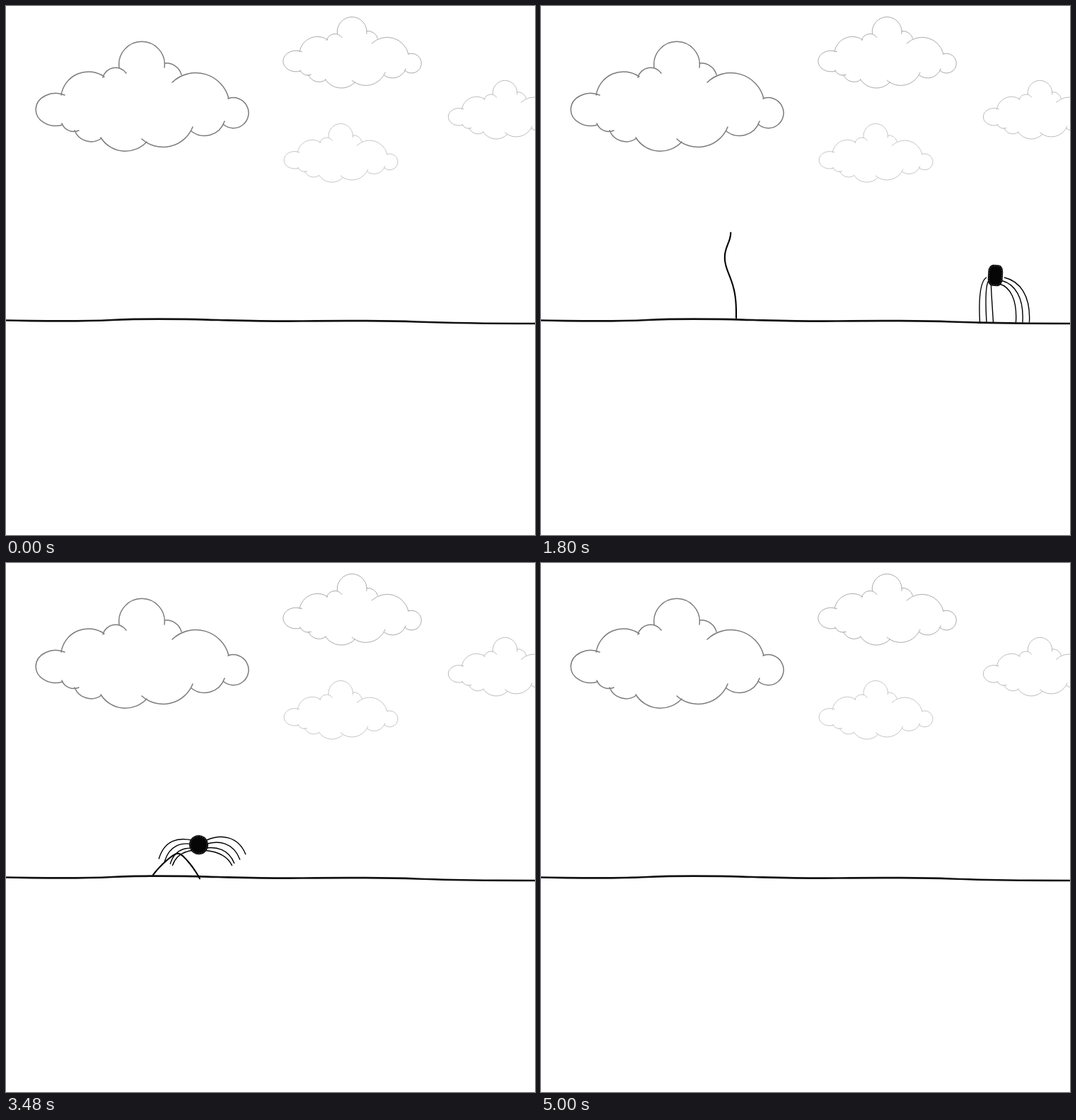
Recreate the animation shown at these times as an HTML page. Size 748 px wide and 748 px high, loop 5.57 s.

```html
<!DOCTYPE html>
<html lang="en">
<head>
<meta charset="utf-8">
<title>Spider and worm</title>
<style>
  html, body { margin: 0; width: 100%; height: 100%; overflow: hidden; background: #fff; }
  svg { display: block; width: 100%; height: 100%; }
  path { fill: none; stroke-linecap: round; stroke-linejoin: round; }
  .cloud { vector-effect: non-scaling-stroke; }
</style>
</head>
<body>
<svg viewBox="0 0 748 748">
  <defs>
    <path id="cloud" class="cloud" d="M160 87A32.3 32.3 0 1 1 224 87
      M137 101A18.5 18.5 0 0 1 170 95 M224 81A22 22 0 0 1 248 97
      M78 126A39 39 0 0 1 139 100 M83 126A28 23 0 1 0 80 168
      M79 166A18 18 0 0 0 103 176 M97 176A25 25 0 0 0 135 187
      M134 186A41 41 0 0 0 199 192 M192 188A45 45 0 0 0 264 171
      M262 177A30 30 0 0 0 309 163 M314 131A21.5 21.5 0 1 1 307 167
      M235 108A48 48 0 0 1 315 131"/>
  </defs>
  <use href="#cloud" stroke="#7c7c7c" stroke-width="1.5"/>
  <use href="#cloud" stroke="#aaa" transform="translate(364.4 -17.2) scale(.65)"/>
  <use href="#cloud" stroke="#c6c6c6" transform="translate(370.5 139.5) scale(.535)"/>
  <use href="#cloud" stroke="#bcbcbc" transform="translate(602.8 78.4) scale(.535)"/>
  <path stroke="#111" stroke-width="2.7" d="M-2 444.5C50 445 90 447 150 444S260 443 300 444S370 446 420 445.5S530 444.6 580 446.5S660 449 750 449"/>
  <path id="worm" stroke="#000" stroke-width="2.1"/>
  <g id="spider">
    <path id="legs" stroke="#000"/>
    <g id="body">
      <rect id="shell" fill="#060606"/>
      <rect id="rim" fill="none" stroke="#888" stroke-width=".5" stroke-dasharray="2 1.5"/>
    </g>
  </g>
</svg>
<script>
const LOOP = 5570, STEP = 80, FIRST = 40;
const ENTER = 600, POUNCE = 3320, LAND = 3640, LIFT = 3880, LEAVE = 5000;
const el = id => document.getElementById(id);
const set = (node, attrs) => { for (const k in attrs) node.setAttribute(k, attrs[k]); };
const mix = (a, b, k) => a.map((v, i) => v + (b[i] - v) * k);
const ramp = (t, from, to) => Math.min(1, Math.max(0, (t - from) / (to - from)));

// Linear interpolation over rows of [time, ...values]
function track(keys, t) {
  let i = 0;
  while (i < keys.length - 2 && t >= keys[i + 1][0]) i++;
  const [a, b] = [keys[i], keys[i + 1]];
  return mix(a, b, ramp(t, a[0], b[0])).slice(1);
}

function show(id, visible) {
  el(id).style.display = visible ? '' : 'none';
  return visible;
}

// time, base x, length, wave, bend, tilt, kink
const wormKeys = [
  [520, 304, 105, 0, 0, 0, 0],
  [1240, 277, 104, 0, 0, .03, 0],
  [1800, 276, 124, .37, 0, 0, 0],
  [2200, 208, 120, 0, .9, 0, 0],
  [2520, 203, 112, 0, 1.85, 0, 0],
  [3080, 208, 95, 0, 2, .65, .65]
];

// The worm is a chain whose heading changes along its length
function drawWorm(t) {
  if (!show('worm', t >= FIRST && t < LAND)) return;
  const [base, length, wave, bend, tilt, kink] = track(wormKeys, t);
  const parts = 40, link = length / parts * ramp(t, FIRST - STEP, 520);
  let x = base, y = 441, d = `M${x} ${y}`;
  for (let i = 0; i < parts; i++) {
    const s = (i + .5) / parts;
    const fold = .5 + .5 * Math.tanh(20 * (s - .5));
    const turn = tilt + bend * (s + (fold - s) * kink) - wave * Math.sin(2 * Math.PI * s * s);
    x += link * Math.sin(turn);
    y -= link * Math.cos(turn);
    d += `L${x.toFixed(2)} ${y.toFixed(2)}`;
  }
  el('worm').setAttribute('d', d);
}

// time, x, y, width, height, roundness, tilt
const bodyKeys = [
  [ENTER, 815, 394, 30, 36, 1, -10],
  [1240, 722, 394, 30, 36, 1, -10],
  [1800, 642.5, 381, 21, 30, .65, 3],
  [2520, 521, 382, 24, 26, 1, 0],
  [3080, 361, 381, 28, 21, 1, -30],
  [POUNCE, 311, 371, 28, 21, 1, -30],
  [LAND, 234, 426, 26, 34, 1, 10]
];

// Standing leg: bows outwards, then drops to the ground; the inner pair is doubled
function standing(side, j, lean, drop) {
  const k = Math.max(0, j - 1);
  const sx = side * (6 + 3.5 * k), sy = 12 - 4.5 * k;
  const fx = side * (16 + 9.5 * k) + lean, dy = drop - sy;
  return [sx, sy, sx + .55 * (fx - sx) + 2 * side, sy + .08 * dy, fx + 2 * side, sy + .4 * dy, fx, drop];
}

// Spread leg: arches sideways, higher legs arch more
function spread(side, j) {
  const sx = side * (13 - 2.2 * j) + 1, sy = 4 - 6.5 * j;
  const tx = side * (68 + 6.5 * j) + 10, ty = 12 - 4 * j - (1.5 + .7 * side) * j * j;
  const crest = 5 - (12 + 1.5 * side) * j;
  const cy = (8 * crest - sy - ty) / 6;
  return [sx, sy, sx + .33 * (tx - sx), cy + j, sx + .75 * (tx - sx), cy - j, tx, ty];
}

function oval(node, w, h, round) {
  set(node, { x: -w / 2, y: -h / 2, width: w, height: h, rx: w / 2 * round, ry: h / 2 * round });
}

function drawSpider(t) {
  if (!show('spider', t >= ENTER && t < LEAVE)) return;
  const [x, y, w, h, round, tilt] = track(bodyKeys, t);
  const open = ramp(t, POUNCE, LAND);
  const fly = ramp(t, LIFT, LEAVE - STEP);
  const size = 1 + .6 * fly ** 1.6;
  const rise = 187 * (1 - (1 - fly) ** 1.4);
  const lean = 13 * Math.exp(-(((t - 1800) / 250) ** 2));
  const drop = 443 + .006 * x - y;

  let d = '';
  for (const side of [-1, 1]) {
    for (let j = 0; j < 4; j++) {
      const leg = mix(standing(side, j, lean, drop), spread(side, j), open);
      d += `M${leg[0]} ${leg[1]}C${leg.slice(2)}`;
    }
  }
  set(el('legs'), { d, 'stroke-width': 1.4 / size });
  set(el('spider'), { transform: `translate(${x - 32 * fly} ${y - rise}) scale(${size})` });
  set(el('body'), { transform: `rotate(${tilt})` });
  oval(el('shell'), w, h, round);
  oval(el('rim'), w - 3, h - 3, round);
}

function render(ms) {
  const t = ms % LOOP;
  const held = t < FIRST ? 0 : FIRST + Math.floor((t - FIRST) / STEP) * STEP;
  drawWorm(held);
  drawSpider(held);
}

function tick() {
  render(performance.now());
  requestAnimationFrame(tick);
}
tick();
</script>
</body>
</html>
```
